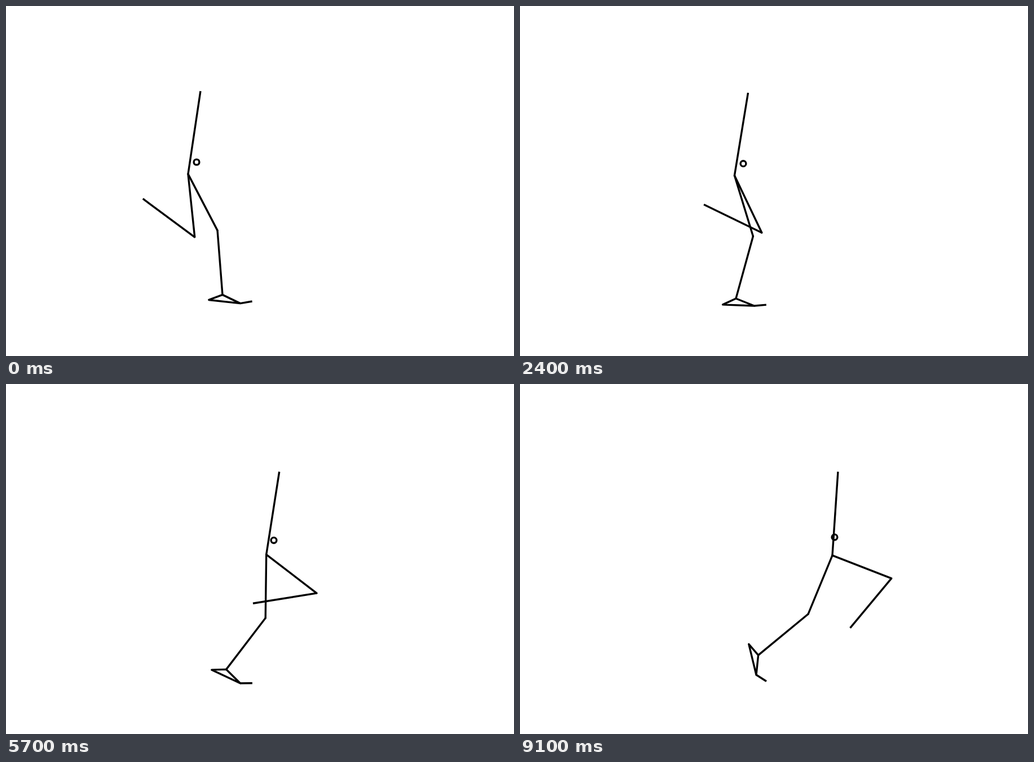
These frames come from a looping animation (901 px wide and 621 px high, 9200 ms). An HTML page without scripts:

```html
<!DOCTYPE html>
<html lang="en">
<head>
<meta charset="utf-8">
<title>Running figure</title>
<style>
  @property --bx { syntax: "<length>"; inherits: true; initial-value: 415.5px; }
  @property --by { syntax: "<length>"; inherits: true; initial-value: 527.6px; }
  @property --cx { syntax: "<length>"; inherits: true; initial-value: 338px; }
  @property --cy { syntax: "<length>"; inherits: true; initial-value: 277px; }
  @property --toe { syntax: "<angle>"; inherits: true; initial-value: 0deg; }
  @property --foot { syntax: "<angle>"; inherits: true; initial-value: 0deg; }
  @property --shank { syntax: "<angle>"; inherits: true; initial-value: 0deg; }
  @property --thigh { syntax: "<angle>"; inherits: true; initial-value: 0deg; }
  @property --trunk { syntax: "<angle>"; inherits: true; initial-value: 0deg; }
  @property --thigh2 { syntax: "<angle>"; inherits: true; initial-value: 0deg; }
  @property --shank2 { syntax: "<angle>"; inherits: true; initial-value: 0deg; }

  html, body { margin: 0; width: 100%; height: 100%; overflow: hidden; background: #fff; }
  svg {
    display: block;
    fill: none; stroke: #000; stroke-width: 3.4;
    stroke-linejoin: round; stroke-linecap: round;
    animation: run 9.2s infinite;
  }
  .end { stroke-linecap: butt; }

  /* Angles are absolute, so each joint subtracts its parent's turn. */
  .ball   { transform: translate(var(--bx), var(--by)); }
  .toe    { transform: rotate(var(--toe)); }
  .foot   { transform: rotate(var(--foot)); }
  .shank  { transform: translate(-33px, -11.7px) rotate(calc(var(--shank) - var(--foot))); }
  .thigh  { transform: translate(0px, -114.6px) rotate(calc(var(--thigh) - var(--shank))); }
  .hip    { transform: translate(0px, -112.7px) rotate(calc(0deg - var(--thigh))); }
  .trunk  { transform: rotate(var(--trunk)); }
  .thigh2 { transform: rotate(var(--thigh2)); }
  .shank2 { transform: translate(0px, 112.5px) rotate(calc(var(--shank2) - var(--thigh2))); }
  .mass   { transform: translate(var(--cx), var(--cy)); }

  /* The pose advances every 100 ms. */
  @keyframes run {
    0% { --bx: 415.5px; --by: 527.6px; --toe: -9.7deg; --foot: 6.3deg; --shank: -4.5deg; --thigh: -27.5deg; --trunk: 8.5deg;
      --thigh2: -6deg; --shank2: 126.5deg; --cx: 338px; --cy: 277px; animation-timing-function: steps(4); }
    4.34% { --bx: 415.5px; --by: 529.6px; --toe: -6.3deg; --foot: 5.8deg; --shank: -1.1deg; --thigh: -25.7deg; --trunk: 8.6deg;
      --thigh2: -8.9deg; --shank2: 125.7deg; --cx: 347.8px; --cy: 277.7px; animation-timing-function: steps(4); }
    8.69% { --bx: 415.5px; --by: 531px; --toe: -4.3deg; --foot: 5.2deg; --shank: 2.25deg; --thigh: -24deg; --trunk: 8.7deg;
      --thigh2: -12deg; --shank2: 124.5deg; --cx: 357.5px; --cy: 278.3px; animation-timing-function: steps(8); }
    17.39% { --bx: 415.5px; --by: 531.7px; --toe: -4.7deg; --foot: 3.2deg; --shank: 8.95deg; --thigh: -20.5deg; --trunk: 9deg;
      --thigh2: -18.6deg; --shank2: 121.1deg; --cx: 376.8px; --cy: 279.2px; animation-timing-function: steps(8); }
    26.08% { --bx: 415.5px; --by: 532px; --toe: -5deg; --foot: 2.2deg; --shank: 15.4deg; --thigh: -17deg; --trunk: 9.3deg;
      --thigh2: -25.5deg; --shank2: 116deg; --cx: 396px; --cy: 279.7px; animation-timing-function: steps(10); }
    36.95% { --bx: 415.5px; --by: 532.2px; --toe: -4.6deg; --foot: 5deg; --shank: 22.95deg; --thigh: -12.1deg; --trunk: 9.5deg;
      --thigh2: -34.3deg; --shank2: 106.8deg; --cx: 420px; --cy: 279.6px; animation-timing-function: steps(10); }
    47.82% { --bx: 415.5px; --by: 532px; --toe: -4deg; --foot: 11.4deg; --shank: 29.8deg; --thigh: -6.9deg; --trunk: 9.5deg;
      --thigh2: -42.8deg; --shank2: 96deg; --cx: 443.8px; --cy: 279px; animation-timing-function: steps(6); }
    54.34% { --bx: 415.5px; --by: 531.7px; --toe: -2.7deg; --foot: 17deg; --shank: 33.5deg; --thigh: -3.45deg; --trunk: 9.3deg;
      --thigh2: -47.5deg; --shank2: 89.2deg; --cx: 458.2px; --cy: 278.3px; animation-timing-function: steps(7); }
    61.95% { --bx: 415.5px; --by: 531px; --toe: -.8deg; --foot: 25.2deg; --shank: 37.4deg; --thigh: -.75deg; --thigh: .75deg; --trunk: 8.9deg;
      --thigh2: -52.5deg; --shank2: 80.9deg; --cx: 475px; --cy: 277.3px; animation-timing-function: steps(7); }
    69.56% { --bx: 415.6px; --by: 530.1px; --toe: 2deg; --foot: 35deg; --shank: 40.8deg; --thigh: 5.1deg; --trunk: 8.05deg;
      --thigh2: -56.7deg; --shank2: 72.2deg; --cx: 492px; --cy: 276.2px; animation-timing-function: steps(8); }
    78.26% { --bx: 416px; --by: 528.5px; --toe: 5.4deg; --foot: 47.2deg; --shank: 44.3deg; --thigh: 10.2deg; --trunk: 6.9deg;
      --thigh2: -60.8deg; --shank2: 62.4deg; --cx: 511.3px; --cy: 274.8px; animation-timing-function: steps(9); }
    88.04% { --bx: 417.1px; --by: 523.9px; --toe: 16.5deg; --foot: 60.9deg; --shank: 47.6deg; --thigh: 15.9deg; --trunk: 5.55deg;
      --thigh2: -64.8deg; --shank2: 51.6deg; --cx: 533.4px; --cy: 273.4px; animation-timing-function: steps(10); }
    98.91% { --bx: 419px; --by: 516px; --toe: 32.6deg; --foot: 76.4deg; --shank: 50.5deg; --thigh: 22.4deg; --trunk: 3.85deg;
      --thigh2: -68.7deg; --shank2: 39.8deg; --cx: 558px; --cy: 271.8px; animation-timing-function: steps(1); }
  }
</style>
</head>
<body>
<svg width="901" height="621" viewBox="0 0 901 621">
  <g class="ball">
    <path class="toe end" d="M0 0H21.4"/>
    <g class="foot">
      <path d="M0 0L-33 -11.7L-56 0Z"/>
      <g class="shank">
        <path d="M0 0V-114.6"/>
        <g class="thigh">
          <path d="M0 0V-112.7"/>
          <g class="hip">
            <path class="trunk end" d="M0 0V-148.8"/>
            <g class="thigh2">
              <path d="M0 0V112.5"/>
              <path class="shank2 end" d="M0 0V114.4"/>
            </g>
          </g>
        </g>
      </g>
    </g>
  </g>
  <circle class="mass" r="4.9"/>
</svg>
</body>
</html>
```
